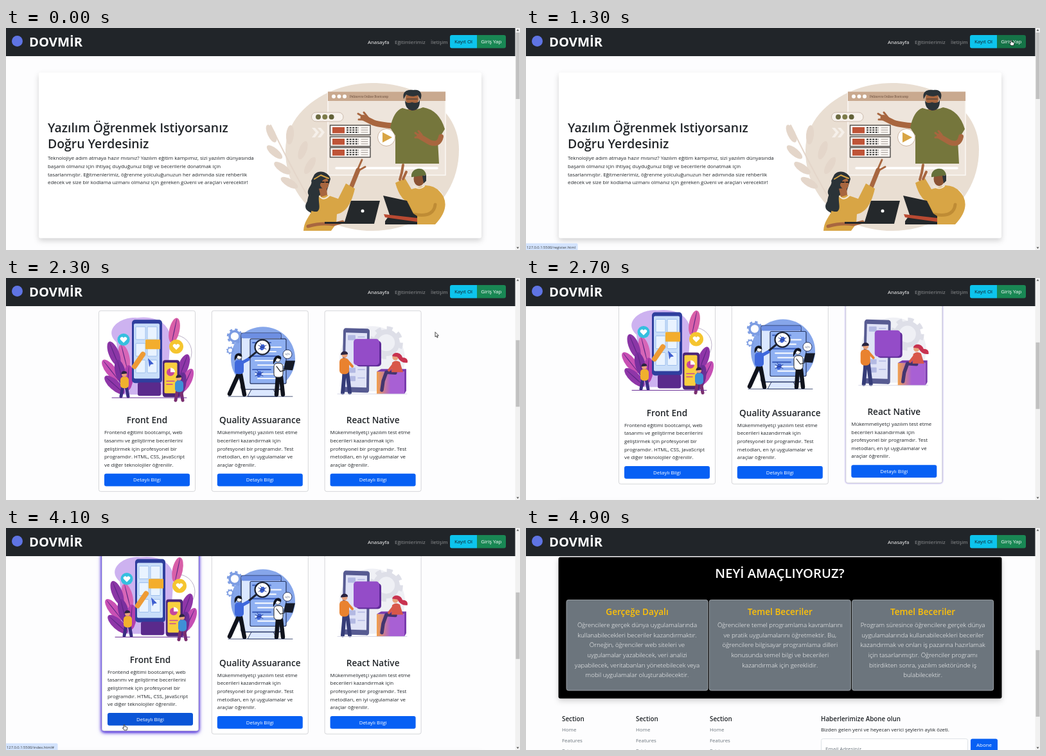
An HTML page for the animation above (5000 ms loop, 800 by 347 pixels).

```html
<!DOCTYPE html>
<html lang="tr">
<head>
<meta charset="utf-8">
<style>
html, body { margin: 0; width: 100%; height: 100%; overflow: hidden; background: #fdfdfe; }
svg { display: block; width: 800px; height: 347px; font-family: "Open Sans", "Noto Sans", sans-serif; }
.lift { filter: drop-shadow(0 4px 4px rgba(0, 0, 0, .17)); }
</style>
</head>
<body>
<svg id="stage" viewBox="0 0 800 347"></svg>
<script>
const BODY = 7.92, INK = '#212529', BLUE = '#0760f4';

// ---- drawing helpers, all return SVG markup ----
const rect = (x, y, w, h, fill, r = 0, more = '') =>
  `<rect x="${x}" y="${y}" width="${w}" height="${h}" fill="${fill}" rx="${r}" ${more}/>`;
const circ = (x, y, r, fill, more = '') => `<circle cx="${x}" cy="${y}" r="${r}" fill="${fill}" ${more}/>`;
const oval = (x, y, rx, ry, turn, fill) =>
  `<ellipse rx="${rx}" ry="${ry}" fill="${fill}" transform="translate(${x} ${y}) rotate(${turn})"/>`;
const path = (d, fill, more = '') => `<path d="${d}" fill="${fill}" ${more}/>`;
const line = (d, color, w) =>
  path(d, 'none', `stroke="${color}" stroke-width="${w}" stroke-linecap="round" stroke-linejoin="round"`);
const edge = (color, w = 1) => `stroke="${color}" stroke-width="${w}"`;
const group = (inner, more = '') => `<g ${more}>${inner}</g>`;
const text = (x, y, size, fill, str, more = '') =>
  `<text x="${x}" y="${y}" font-size="${size}" fill="${fill}" ${more}>${str}</text>`;
const lines = (x, y, step, size, fill, rows, more) =>
  rows.map((s, i) => text(x, y + i * step, size, fill, s, more)).join('');
const MID = 'text-anchor="middle"', SEMI = 'font-weight="600"';

// ---- hero ----
function heroArt() {
  const skin = '#a8663f', dark = '#2b3338', gold = '#d8a545', beige = '#e4d6ca';
  const leaves = [[413, 165, -25], [442, 167, 5], [418, 194, -50], [462, 191, 20],
    [430, 219, -55], [473, 215, 30], [441, 242, -60]];
  const rows = [152, 170, 187].map(y =>
    rect(504.5, y, 62.5, 15, '#fbf7f3', 0, edge('#4d4a48', 1.4)) + rect(508, y + 3, 19, 9.5, '#bf5438') +
    [4, 7.5, 11].map(d => `<path d="M530 ${y + d}h19" stroke="#444" stroke-width="1.8" stroke-dasharray="3 1.6"/>` +
      line(`M553 ${y + d}h10`, '#8d8680', .8)).join('')).join('');
  return path('M435 190C436 130 500 86 570 86C640 86 705 125 705 190C705 262 650 317 570 317C490 317 434 262 435 190Z', '#e9ded2') +
    line('M470 264C452 232 430 190 412 152', beige, 2) +
    leaves.map(([x, y, a]) => oval(x, y, 6, 15, a, beige)).join('') +
    path('M476 156h5l6 7-6 8h-5l6-8zM485 156h5l6 7-6 8h-5l6-8zM660 253h5l6 7-6 8h-5l6-8zM669 253h5l6 7-6 8h-5l6-8z', '#f6f0ea') +
    // browser window
    rect(501, 100, 183, 130, '#eee5dc', 0, edge('#fbf8f5', 1.5)) + rect(501, 99.5, 183, 14.5, '#c9a98f') +
    [510, 518.5, 527].map(x => circ(x, 107, 3, '#fff')).join('') +
    text(535, 109, 4.6, '#6b4e3d', 'Pelinovra Online Bootcamp', 'style="font-family:Noto Serif,serif"') +
    line('M514 219H671', '#fff', 3.5) +
    rect(475.5, 132, 49.5, 14, '#f8f3ee', 7, edge('#cdbcae')) +
    ['#6c6b42', '#7d7c4a', '#626238'].map((c, i) => circ(486 + i * 10.3, 139, 4, c)).join('') + rows +
    circ(592, 171, 13.5, '#fff', edge('#cbb29d')) + path('M586 163v16l15-8z', gold) +
    // trainer
    line('M614 154C600 153 584 152 572 148L556 140', skin, 9) + line('M560 141L548 134M560 143L549 143M565 142L557 132', skin, 3) +
    path('M617 125Q632 131 649 124Q674 128 683 158L672 176L674 212H606V168L598 156Q603 130 617 125Z', '#75763c') +
    line('M677 170Q674 184 660 179L643 169', skin, 8) + line('M646 171L637 164M646 171L637 171M647 167L642 161', skin, 3) +
    rect(626, 118, 13, 11, skin, 4) + oval(632, 111, 10, 13, 0, skin) +
    path('M619 111C616 98 626 96 634 97C645 95 649 103 645 112L641 105C634 108 628 107 623 104Z', dark) +
    path('M621 113Q623 119 632 116Q642 119 644 112Q645 129 632 129Q621 127 621 113Z', dark) +
    line('M624 111h6M634 111h6M630 111h4', dark, 1.2) +
    // woman with laptop
    path('M480 229C488 220 503 226 505 236L497 262L503 284C490 294 474 292 467 283C463 274 473 270 471 261C466 252 478 246 475 239Z', dark) +
    line('M536 252L548 222', skin, 7) + line('M547 222L554 206M550 222L559 217', skin, 3) +
    path('M463 317C464 303 470 297 475 288C478 274 482 262 494 259L517 267L529 243L543 251C538 273 530 288 515 291L514 306L506 317Z', gold) +
    path('M471 262C466 276 470 288 484 287C492 283 484 270 488 258Z', dark) +
    oval(495, 242, 7, 10, -12, skin) + path('M480 246C481 227 497 226 503 235Q491 234 487 250Z', dark) +
    path('M487 251L499 250L500 261L490 264Z', skin) + line('M480 236L490 230L502 235', gold, 2) +
    line('M491 241h4M498 241h4', '#222', 2) + line('M488 263Q494 271 503 262', '#f5eadb', 2) +
    line('M470 310Q490 304 510 307L524 303', skin, 5) +
    path('M537 270H582L573 306H496V303H527Z', '#24282b') + circ(555, 286, 2.5, '#fff') +
    // man with laptop
    path('M631 252L621 235L606 242Q612 266 626 273L616 302L634 307H668Q690 284 681 264Q671 246 653 246Z', gold) +
    line('M613 237L616 226L618 214M618 236L623 225', skin, 4) +
    oval(643, 236, 8.5, 11, 0, '#8b5233') + path('M631 233C629 218 652 214 654 230L632 233Z', '#65703a') +
    path('M648 231l6-1v9l-4 4z', dark) + line('M634 247Q643 254 651 247', '#f3e7d6', 2) +
    line('M668 276Q666 295 640 292L626 290', '#bf8c35', 5) + line('M626 290l-10-2', skin, 4) +
    path('M587 262L624 270L634 290L640 294V307H590V302L597 292Z', '#24282b') +
    path('M588 291L640 297V303L590 296Z', '#b94a32');
}

const hero = rect(51, 69.5, 689, 259, '#fff', 3, 'class="lift"') +
  lines(65, 163, 25.2, 19.4, INK, ['Yazılım Öğrenmek Istiyorsanız', 'Doğru Yerdesiniz'], SEMI) +
  lines(65, 206.3, 12.6, BODY, INK, [
    'Teknolojiye adım atmaya hazır mısınız? Yazılım eğitim kampımız, sizi yazılım dünyasında',
    'başarılı olmanız için ihtiyaç duyduğunuz bilgi ve becerilerle donatmak için',
    'tasarlanmıştır. Eğitmenlerimiz, öğrenme yolculuğunuzun her adımında size rehberlik',
    'edecek ve size bir kodlama uzmanı olmanız için gereken güveni ve araçları verecektir!']) + heroArt();

// ---- course cards ----
const heart = (x, y) => path(`M${x} ${y + 5}l-5-5a2.6 2.6 0 0 1 5-2.5a2.6 2.6 0 0 1 5 2.5z`, '#fff');
const figure = (x, y, shirt, legs, skin = '#e9a27c') =>
  line(`M${x - 2} ${y + 18}l-3 17M${x + 3} ${y + 18}l3 17`, legs, 5) + rect(x - 6, y + 4, 13, 18, shirt, 5) +
  circ(x, y, 4, skin) + path(`M${x - 4.5} ${y}a4.5 4.5 0 0 1 9 -1z`, '#2a2440');

const frontArt = circ(262, 262, 27, '#fff', edge('#a99bb8', .8)) +
  path('M172 246C150 226 180 205 204 208C238 204 252 220 256 236L250 328L180 328Z', '#cdb2f0') +
  [[262, 228, 12, '#d85fa8'], [276, 284, 20, '#8f36a8'], [281, 306, 25, '#c64fb4'], [272, 313, 12, '#6b2f96'],
   [184, 269, -14, '#d765b7'], [168, 264, -22, '#8b36a6'], [163, 290, -38, '#c850b4'], [178, 293, -14, '#7a2f9e'],
   [190, 302, 4, '#b13fae'], [169, 313, -48, '#8f36a8']]
    .map(([x, y, a, c]) => oval(x, y, 8, 20, a, c) + oval(x, y, .6, 19, a, '#5b2785')).join('') +
  rect(196, 211, 47, 99, '#2f3f9e', 5) + rect(199, 217, 40, 86, '#c9def9', 2) +
  [222, 248, 274].map(y => rect(202, y, 15, 20, '#e9f3ff', 1, edge('#90b5ea', .8)) +
    rect(220, y, 15, 20, '#e9f3ff', 1, edge('#90b5ea', .8))).join('') +
  rect(217, 242, 23, 15, '#f3ad2d', 1) + line('M200 284L213 265', '#ee9b35', 8) + path('M221 271l9 9-5 1-2 4z', '#3f5fd0') +
  rect(205, 309, 36, 21, '#5a2a8c', 3) +
  rect(244, 274, 26, 58, '#4a2478', 4) + rect(246.5, 278, 20, 48, '#f8cf3f', 2) +
  circ(256, 293, 6, '#c5479d') + path('M256 293V286A7 7 0 0 1 263 293Z', '#fff') +
  line('M250 307h12M250 312h9', '#c5479d', 1.5) +
  circ(183, 242, 9.5, '#35bfdf') + heart(183, 242) + circ(265, 253, 11, '#f5c52f') + heart(265, 253) +
  figure(184, 296, '#f0b02e', '#3a2c83') + figure(269, 302, '#3f8fd6', '#7a2f70') + line('M165 333h116', '#6b2f96', 1);

const gear = (x, y, r, c) => circ(x, y, r, 'none', edge(c, r * .45)) +
  circ(x, y, r * 1.35, 'none', `${edge(c, r * .35)} stroke-dasharray="${r * .53} ${r * .53}"`);
const bug = (x, y) => oval(x, y, 3.5, 5, 25, '#3e64d8') +
  line(`M${x - 6} ${y - 3}l12 6M${x - 6} ${y + 3}l12-6M${x - 3} ${y - 6}l2 3`, '#233a8a', .9);
const qaArt = circ(400, 272, 50, '#86a6ea') + gear(356, 237, 8, '#7c9ce2') + gear(349, 259, 4, '#7c9ce2') +
  path('M383 318h32l7 13h-46z', '#dbe7ff', edge('#26345f')) +
  rect(366, 232, 62, 88, '#dbe7ff', 3, edge('#26345f', 1.4)) + rect(366, 232, 62, 8, '#6d8fe3', 3) +
  rect(380, 241, 56, 70, '#8fb0f2', 2, edge('#26345f', 1.2)) +
  [...Array(9)].map((_, i) => line(`M${384 + i % 3 * 4} ${247 + i * 7}h${28 + i % 2 * 12}`, i % 3 ? '#fff' : '#3558b8', 1.8)).join('') +
  line('M389 262L377 272', '#1d2333', 3) + circ(399, 254, 11.5, '#fff', edge('#1d2333', 2.2)) + bug(399, 254) + bug(394, 296) +
  circ(438, 265, 7, '#fff', edge('#26345f')) + text(438, 267, 5, '#26345f', '&lt;/&gt;', MID) +
  line('M362 296L348 327M365 296L371 328', '#10131c', 6.5) + rect(356, 274, 14, 22, '#3f68dc', 5) + line('M366 279l11-6', '#3f68dc', 5) +
  circ(363, 269, 4, '#fff', edge('#222', .7)) + path('M356 275C353 260 369 261 367 269L361 267Z', '#10131c') +
  line('M423 300l-2 28M428 300l3 28', '#10131c', 6.5) + rect(417, 279, 14, 22, '#fff', 5, edge('#222', 1)) +
  circ(423, 273, 4, '#fff', edge('#222', .7)) + path('M416 281C414 263 431 265 428 273L422 271Z', '#10131c') +
  line('M421 284l6 8 7-2', '#222', 1.2) + path('M432 289l3-14h15l-4 15z', '#161b28') + line('M346 331h100', '#26345f', .8);

const nativeArt = '<linearGradient id="box"><stop stop-color="#f2a04a"/><stop offset=".5" stop-color="#a860d4"/></linearGradient>' +
  oval(570, 272, 51, 51, 0, '#eff0f5') + gear(592, 247, 17, '#dedfe8') +
  path('M529 224L563 225Q566 226 566 229L565 322Q564 326 560 325L526 324Q523 323 523 320L525 228Q526 224 529 224Z', '#575b92') +
  path('M529 231L562 232L561 317L527 316Z', '#dfe2f6') +
  [235, 286, 299].map(y => rect(532, y, 12, 8, '#b3b9e3', 1) + line(`M548 ${y + 3}h10`, '#b3b9e3', 1.5)).join('') +
  rect(545, 244, 39, 40, '#5f2a98', 5) + rect(541, 241, 40, 41, '#944cc8', 5) +
  rect(577, 292, 43, 35, 'url(#box)') + path('M577 292l7-4h39l-3 4zM620 292l3-4v34l-3 5z', '#7a3cae') +
  line('M527 292l-3 33M531 292l4 33', '#353c78', 6) + rect(519, 271, 15, 25, '#e9822f', 6) + line('M532 276l7 8', '#e9822f', 4) +
  circ(527, 266, 4.5, '#e9a27c') + path('M521 266C521 258 533 259 532 265Z', '#2a2440') +
  line('M606 294l-14-1-5 14-2 14', '#43356f', 5.5) + path('M601 278Q606 273 613 277L618 293H600Z', '#d8574a') + line('M603 281l-7 9', '#d8574a', 4) +
  circ(606, 270, 4.5, '#e9a27c') + path('M601 268C603 260 615 262 617 270Q626 270 625 278Q615 280 609 269Z', '#c8324f') +
  line('M516 327h108', '#c9cbe0', .8);

const qaText = ['Mükemmeliyetçi yazılım test etme', 'becerileri kazandırmak için',
  'profesyonel bir programdır. Test', 'metodları, en iyi uygulamalar ve', 'araçlar öğrenilir.'];
const courses = [
  ['Front End', frontArt, ['Frontend eğitimi bootcampi, web', 'tasarımı ve geliştirme becerilerini',
    'geliştirmek için profesyonel bir', 'programdır. HTML, CSS, JavaScript', 've diğer teknolojiler öğrenilir.']],
  ['Quality Assuarance', qaArt, qaText],
  ['React Native', nativeArt, qaText]];
const cards = courses.map(([name, art, rows], i) => {
  const x = 144.5 + i * 175.8;
  return group(rect(x, 354.5, 150, 282.5, '#fff', 3, edge('#d5d6d9')) +
    group(art, 'transform="translate(0 157.5)"') +
    text(x + 75, 530.5, 13.6, INK, name, `${MID} ${SEMI}`) +
    lines(x + 8.5, 547.8, 12.6, BODY, INK, rows) +
    rect(x + 8.5, 609, 133, 19.8, BLUE, 3, `id="more${i}"`) +
    text(x + 75, 621.8, BODY, '#fff', 'Detaylı Bilgi', MID), `id="card${i}"`);
}).join('');

// ---- goals and footer ----
const goals = [
  ['Gerçeğe Dayalı', ['Öğrencilere gerçek dünya uygulamalarında', 'kullanabilecekleri beceriler kazandırmaktır.',
    'Örneğin, öğrenciler web siteleri ve', 'uygulamalar yazabilecek, veri analizi',
    'yapabilecek, veritabanları yönetebilecek veya', 'mobil uygulamalar oluşturabilecektir.']],
  ['Temel Beceriler', ['Öğrencilere temel programlama kavramlarını', 've pratik uygulamalarını öğretmektir. Bu,',
    'öğrencilere bilgisayar programlama dilleri', 'konusunda temel bilgi ve becerileri', 'kazandırmak için gereklidir.']],
  ['Temel Beceriler', ['Program süresince öğrencilere gerçek dünya', 'uygulamalarında kullanabilecekleri beceriler',
    'kazandırmak ve onları iş pazarına hazırlamak', 'için tasarlanmıştır. Öğrenciler programı',
    'bitirdikten sonra, yazılım sektöründe iş', 'bulabilecektir.']]];
const aims = rect(50.5, 663.5, 690, 221, '#000', 3, 'class="lift"') +
  text(395, 696.5, 20.2, '#fff', 'NEYİ AMAÇLIYORUZ?', `${MID} ${SEMI}`) +
  goals.map(([name, rows], i) => {
    const x = 63 + i * 222.3;
    return rect(x, 730.5, 220, 141.5, '#6c757d', 3, edge('#9aa0a5')) +
      text(x + 110, 754, 13.6, '#ffc107', name, `${MID} ${SEMI}`) +
      lines(x + 110, 773.2, 15.65, 9.75, '#fff', rows, `${MID} font-weight="300"`);
  }).join('');
const footer = [56, 171, 286].map(x => text(x, 920, 9.86, INK, 'Section', SEMI) +
    lines(x, 936.4, 16.4, BODY, '#6c757d', ['Home', 'Features', 'Pricing', 'FAQs', 'About'])).join('') +
  text(459, 920, 9.86, INK, 'Haberlerimize Abone olun', SEMI) +
  text(459, 936.4, BODY, INK, 'Bizden gelen yeni ve heyecan verici şeylerin aylık özeti.') +
  rect(459.5, 947.5, 228, 30, '#fff', 3, edge('#dee2e6')) + text(466, 966.3, BODY, '#6c757d', 'Email Adresiniz') +
  rect(692, 947.5, 42, 20, BLUE, 3) + text(713, 960.5, BODY, '#fff', 'Abone', MID);

// ---- fixed parts ----
const nav = rect(0, 0, 793, 44, INK) + circ(17.5, 20.5, 8.5, '#5f74e4') +
  text(36, 28.8, 20.2, '#fff', 'DOVMİR', 'font-weight="700"') +
  text(563, 24.5, BODY, '#fff', 'Anasayfa') + text(605, 24.5, BODY, '#919395', 'Eğitimlerimiz') +
  text(661, 24.5, BODY, '#919395', 'İletişim') +
  path('M694 11H733V31.5H694a3 3 0 0 1-3-3V14a3 3 0 0 1 3-3z', '#0dc4ec', 'id="join"') +
  path('M733 11H775a3 3 0 0 1 3 3V28.5a3 3 0 0 1-3 3H733z', '#198754', 'id="login"') +
  text(712, 24.3, BODY, '#10222b', 'Kayıt Ol', MID) + text(755.3, 24.3, BODY, '#fff', 'Giriş Yap', MID);
const bar = rect(792.5, 0, 7.5, 347, '#f1f1f1') + rect(793.5, 7, 6, 104, '#c1c1c1', 0, 'id="thumb"') +
  path('M794.5 4.5l2-2.5 2 2.5zM794.5 342.5l2 2.5 2-2.5z', '#505050');
const status = group(rect(-2, 336.5, 82.5, 12, '#d3e3fd', 2) +
  text(1, 344.6, 5.8, '#3c4043', '', 'id="link"'), 'id="status"');
const pointer = group(
  path('M0 0V7.6L1.8 6L3 8.8L4.2 8.2L3 5.6H5.4Z', '#fff', `${edge('#000', .7)} id="arrow"`) +
  path('M-.8 .8Q0 -.6 .9 .8V3.2L4 4Q5 4.4 4.8 6L4 9H0L-2.6 5.6Q-2.4 4.4 -.8 5.6Z', '#fff', `${edge('#000', .7)} id="hand"`),
  'id="pointer"');

document.getElementById('stage').innerHTML =
  rect(0, 0, 800, 347, '#fdfdfe') + group(hero + aims + cards + footer, 'id="page"') + nav + bar + status + pointer;

// ---- motion ----
const el = id => document.getElementById(id);
const clamp = v => Math.max(0, Math.min(1, v));
const show = (id, on) => el(id).setAttribute('visibility', on ? 'visible' : 'hidden');
const paint = (id, on, hot, cold) => el(id).setAttribute('fill', on ? hot : cold);
const within = (t, a, b) => t >= a && t < b;

// keys: [time, value...], eased between neighbours
function track(keys, t) {
  let i = 0;
  while (i < keys.length - 2 && t >= keys[i + 1][0]) i++;
  const [a, b] = [keys[i], keys[i + 1]];
  const u = clamp((t - a[0]) / (b[0] - a[0])), k = u * u * (3 - 2 * u);
  return a.slice(1).map((v, n) => v + (b[n + 1] - v) * k);
}
const scrollKeys = [[1560, 0], [1880, 157.5], [2000, 157.5], [2360, 315], [4130, 315], [4450, 472.5], [4550, 472.5], [4971, 630]];
const pointerKeys = [[500, 640, 140], [900, 708, 30], [1200, 755, 18.5], [1350, 755, 18.5], [1700, 668, 84.5], [2400, 668, 84.5],
  [2700, 600, 270], [3100, 400, 320], [3450, 184, 307]];
const hovers = [[3130, 4250], [2950, 3130], [2580, 2940]];
const RISE = 350;

function draw(t) {
  const [scroll] = track(scrollKeys, t), [px, py] = track(pointerKeys, t);
  el('page').setAttribute('transform', `translate(0 ${-scroll})`);
  el('thumb').setAttribute('y', 7 + scroll * .2975);
  hovers.forEach(([start, end], i) => {
    const top = clamp((end - start) / RISE);
    const k = t < end ? clamp((t - start) / RISE) : clamp(top - (t - end) / RISE);
    const glow = `drop-shadow(0 ${k}px ${2.7 * k}px rgba(62, 28, 215, ${.85 * k}))`;
    el('card' + i).setAttribute('transform', `translate(${5 * k} ${-5 * k})`);
    el('card' + i).style.filter = k ? `${glow} ${glow}` : 'none';
  });
  const onJoin = within(t, 850, 1050), onLogin = within(t, 1050, 1450), onMore = within(t, 3400, 4250);
  paint('join', onJoin, '#31d2f2', '#0dc4ec');
  paint('login', onLogin, '#157347', '#198754');
  paint('more0', onMore, '#0b55d7', BLUE);
  el('link').textContent = '127.0.0.1:5500/' + (t < 2000 ? 'register.html' : 'index.html#');
  show('status', onJoin || onLogin || within(t, 3700, 4350));
  show('hand', onJoin || onLogin || onMore);
  // over running text the pointer is too thin to see
  show('arrow', within(t, 500, 850) || within(t, 1450, 2580));
  el('pointer').setAttribute('transform', `translate(${px} ${py})`);
}

function tick(now) {
  draw(Math.floor(now % 5000 / 100) * 100);
  requestAnimationFrame(tick);
}
draw(0);
requestAnimationFrame(tick);
</script>
</body>
</html>
```
